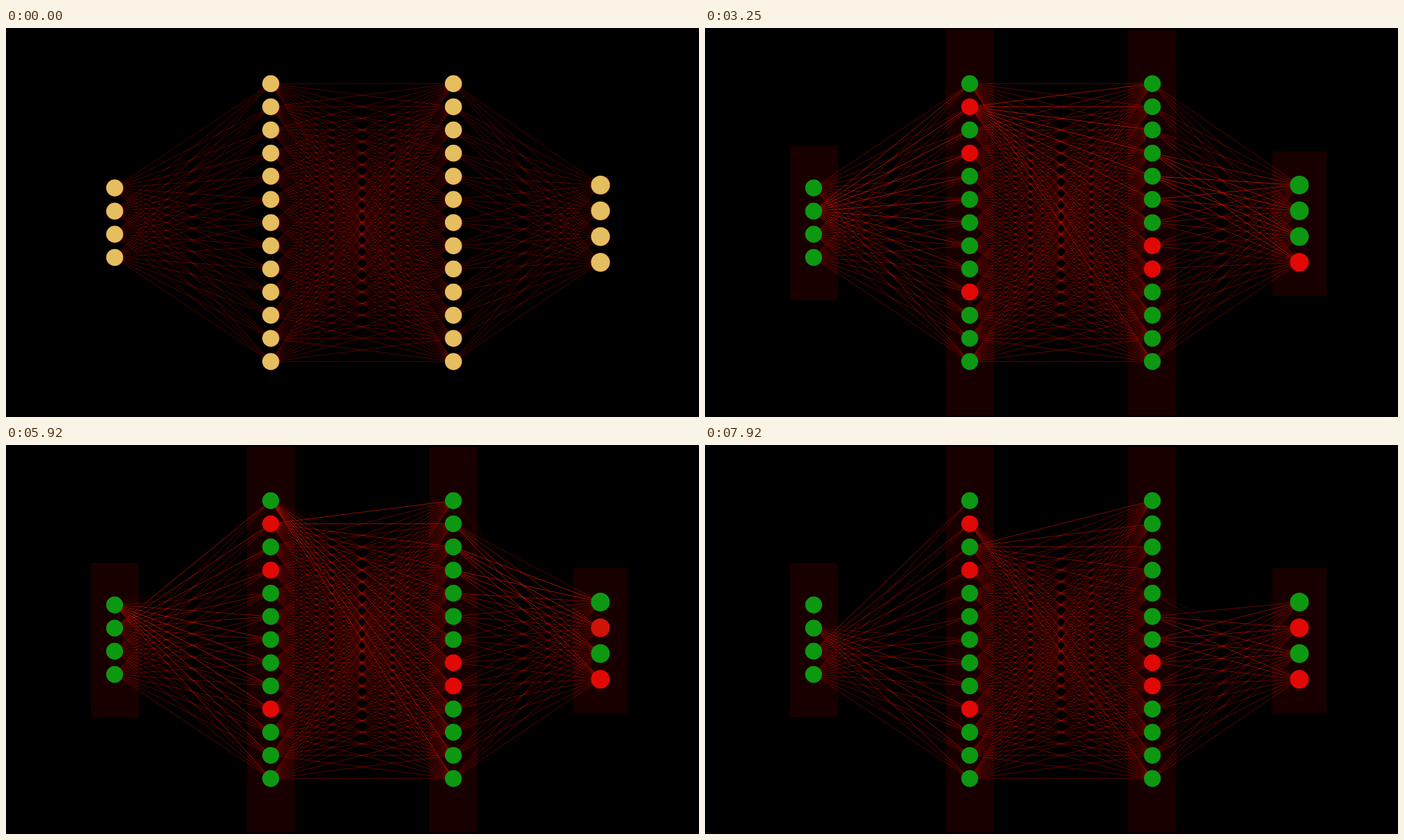
An HTML page with a canvas for the animation above (8 s loop, 960x540 px).

```html
<!DOCTYPE html>
<html lang="en">
<head>
<meta charset="utf-8">
<title>Network</title>
<style>
html, body { margin: 0; width: 100%; height: 100%; overflow: hidden; background: #000; }
canvas { display: block; width: 960px; height: 540px; }
</style>
</head>
<body>
<canvas id="stage" width="960" height="540"></canvas>
<script>
const ctx = document.getElementById('stage').getContext('2d');
const LOOP = 8000;
const STEP = 1000 / 12;

const layers = [
  { x: 150.5, y: 222, gap: 32.15, n: 4, r: 11.7, red: [], panel: [118, 164, 66, 214] },
  { x: 366.7, y: 77.2, gap: 32.15, n: 13, r: 11.7, red: [1, 3, 9], panel: [334, 2, 66, 536] },
  { x: 619.7, y: 77.2, gap: 32.15, n: 13, r: 11.7, red: [7, 8], panel: [586, 3, 67, 535] },
  { x: 823.4, y: 218, gap: 35.75, n: 4, r: 13, red: [3], panel: [786, 171, 75, 201] }
];

const YELLOW = [229, 190, 96];
const GREEN = [13, 152, 18];
const RED = [224, 9, 6];

const clamp = v => Math.min(1, Math.max(0, v));
const smooth = (a, b, t) => {
  const u = clamp((t - a) / (b - a));
  return u * u * (3 - 2 * u);
};
const mix = (a, b, u) => a.map((v, i) => v + (b[i] - v) * u);
const rgb = c => `rgb(${c.map(Math.round).join(',')})`;
const nodeY = (layer, i) => layer.y + layer.gap * i;

// Value at t along a list of [time, value] points
function track(points, t) {
  let k = 1;
  while (k < points.length - 1 && t > points[k][0]) k++;
  const [t0, v0] = points[k - 1], [t1, v1] = points[k];
  return v0 + (v1 - v0) * (t - t0) / (t1 - t0);
}

const firstWave = [[2250, 3], [3250, 15], [4170, 25], [4750, 31]];
const secondWave = [[4750, -3], [5250, 1.5], [6580, 14.5], [7920, 23]];

function wave(t) {
  if (t < 4750) {
    const power = smooth(2700, 3200, t) * (1 - 0.6 * smooth(3400, 4150, t)) * (1 - smooth(4250, 4700, t));
    return { head: track(firstWave, t), power, erase: false };
  }
  return { head: track(secondWave, t), power: 1 - 0.45 * smooth(6600, 7900, t), erase: true };
}

// Edges ahead of the head glow further than those behind it
function glow(d) {
  return Math.exp(-((d / (d > 0 ? 9 : 4)) ** 2));
}

function drawEdges(t) {
  const back = smooth(2250, 3100, t);
  const base = t < 2250 ? 0.36 * (1 - smooth(540, 1500, t)) : 0.42 * back;
  if (base <= 0) return;
  const { head, power, erase } = wave(t);
  ctx.lineWidth = 1;
  for (let k = 0; k < 3; k++) {
    const a = layers[k], b = layers[k + 1];
    for (let i = 0; i < a.n; i++) {
      for (let j = 0; j < b.n; j++) {
        const index = i * b.n + j;
        const lit = power * glow(index - head);
        const shown = erase ? clamp((index - head + 6.5) / 4) : 1;
        const alpha = (base + 0.36 * lit * back) * shown;
        if (alpha <= 0) continue;
        ctx.strokeStyle = `rgba(205,${Math.round(12 + 12 * lit)},4,${alpha})`;
        ctx.beginPath();
        ctx.moveTo(a.x, nodeY(a, i));
        ctx.lineTo(b.x, nodeY(b, j));
        ctx.stroke();
      }
    }
  }
}

function disc(x, y, r, fill) {
  ctx.fillStyle = fill;
  ctx.beginPath();
  ctx.arc(x, y, r, 0, 2 * Math.PI);
  ctx.fill();
}

function drawNodes(t) {
  const turn = smooth(2250, 3100, t);
  const alarm = smooth(5500, 6000, t);
  layers.forEach((layer, k) => {
    for (let i = 0; i < layer.n; i++) {
      let active = layer.red.includes(i) ? RED : GREEN;
      if (k === 3 && i === 1) active = mix(GREEN, RED, alarm);
      const y = nodeY(layer, i);
      if (turn < 1) disc(layer.x + 0.6, y + 0.2, layer.r, `rgba(170,30,10,${1 - turn})`);
      disc(layer.x, y, layer.r, rgb(mix(YELLOW, active, turn)));
    }
  });
}

function draw(t) {
  ctx.fillStyle = '#000';
  ctx.fillRect(0, 0, 960, 540);
  ctx.fillStyle = `rgba(25,0,0,${smooth(2250, 3100, t)})`;
  layers.forEach(layer => ctx.fillRect(...layer.panel));
  drawEdges(t);
  drawNodes(t);
}

const start = performance.now();
function tick() {
  const t = (performance.now() - start) % LOOP;
  draw(Math.floor((t + 4) / STEP) * STEP % LOOP);
  requestAnimationFrame(tick);
}
tick();
</script>
</body>
</html>
```
